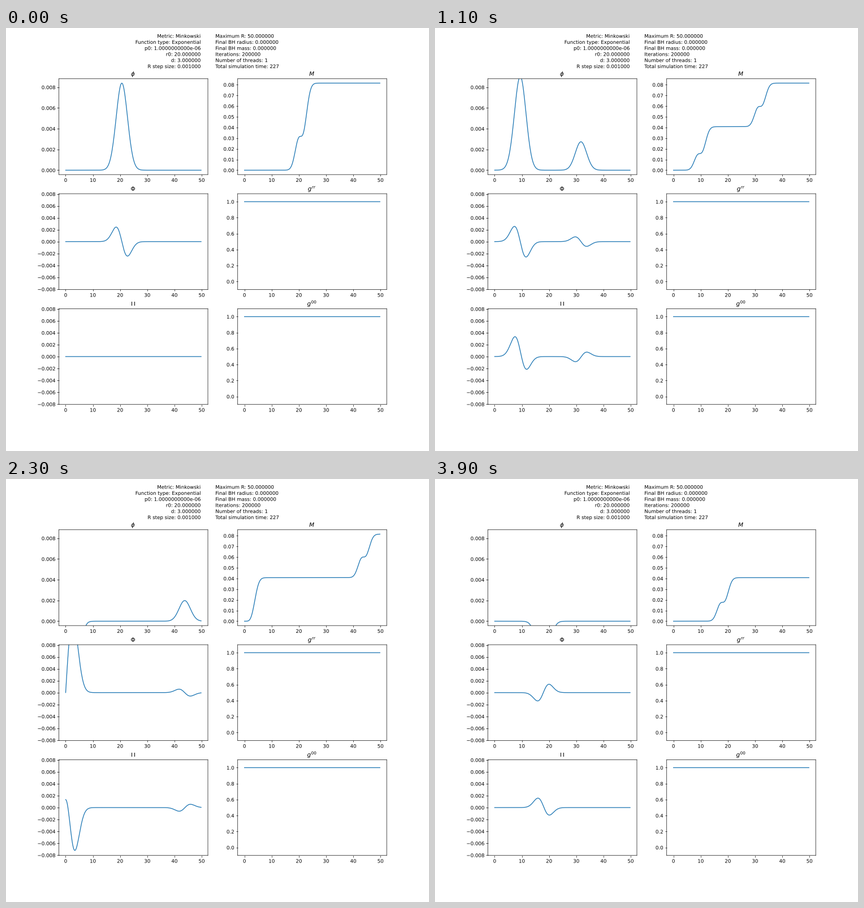
A matplotlib script that plays this animation: 748x748 px, repeating every 4 s.

```python
import numpy as np
import matplotlib.pyplot as plt
from matplotlib.animation import FuncAnimation
from matplotlib.patheffects import Normal

SIZE = 748
FRAMES, INTERVAL = 40, 100
P0, R0, D = 1e-6, 20.0, 3.0

# Unsnapped lines and text drawn as paths keep sub-pixel positions.
plt.rcParams.update({
    "font.family": "DejaVu Sans",
    "font.size": 10,
    "text.hinting": "none",
    "path.snap": False,
    "path.effects": [Normal()],
})

r = 0.2 * np.arange(250)
rs = np.maximum(r, 1e-3)  # keeps the division at the centre finite


def pulse(x):
    """Odd extension of r * phi at t = 0, and its derivative."""
    a = np.abs(x)
    env = P0 * np.exp(-((a - R0) / D) ** 2)
    return np.sign(x) * env * a**4, env * (4 * a**3 - 2 * a**4 * (a - R0) / D**2)


def fields(t):
    """Spherical wave in flat space: phi, its r and t derivatives, and mass."""
    f_in, df_in = pulse(rs + t)
    f_out, df_out = pulse(rs - t)
    phi = (f_in + f_out) / (2 * rs)
    grad = (df_in + df_out) / (2 * rs) - phi / rs
    rate = (df_in - df_out) / (2 * rs)
    density = 2 * np.pi * r**2 * (grad**2 + rate**2)
    steps = (density[1:] + density[:-1]) / 2 * np.diff(r)
    mass = np.concatenate([[0], np.cumsum(steps)])
    return phi, grad, rate, mass


fig, axes = plt.subplots(3, 2, figsize=(12, 12), dpi=SIZE / 12)


def write_lines(x, align, lines):
    for i, line in enumerate(lines):
        y = 1 - (17.3 + 10.72 * i) / SIZE
        fig.text(x, y, line, ha=align, va="baseline")


write_lines(0.46, "right", [
    "Metric: Minkowski",
    "Function type: Exponential",
    "p0: 1.0000000000e-06",
    "r0: 20.000000",
    "d: 3.000000",
    "R step size: 0.001000",
])
write_lines(0.495, "left", [
    "Maximum R: 50.000000",
    "Final BH radius: 0.000000",
    "Final BH mass: 0.000000",
    "Iterations: 200000",
    "Number of threads: 1",
    "Total simulation time: 227",
])


def panel(ax, title, data, ylim=None):
    line, = ax.plot(r, data)
    ax.set_title(title)
    # Freeze the limits so later curves are clipped.
    ax.set_xlim(ax.get_xlim())
    ax.set_ylim(ylim or ax.get_ylim())
    return line


phi, grad, rate, mass = fields(0)
ones = np.ones_like(r)
wave_lim = (-0.00805, 0.00805)
lines = [
    panel(axes[0, 0], r"$\phi$", phi),
    panel(axes[1, 0], r"$\Phi$", grad, wave_lim),
    panel(axes[2, 0], r"$\Pi$", rate, wave_lim),
    panel(axes[0, 1], r"$M$", mass),
]
panel(axes[1, 1], r"$g^{rr}$", ones, (-0.1, 1.1))
panel(axes[2, 1], r"$g^{00}$", ones, (-0.1, 1.1))


def update(frame):
    for line, data in zip(lines, fields(frame)):
        line.set_ydata(data)
    return lines


anim = FuncAnimation(fig, update, frames=FRAMES, interval=INTERVAL,
                     repeat=True, repeat_delay=0, blit=False)
plt.show()
```
